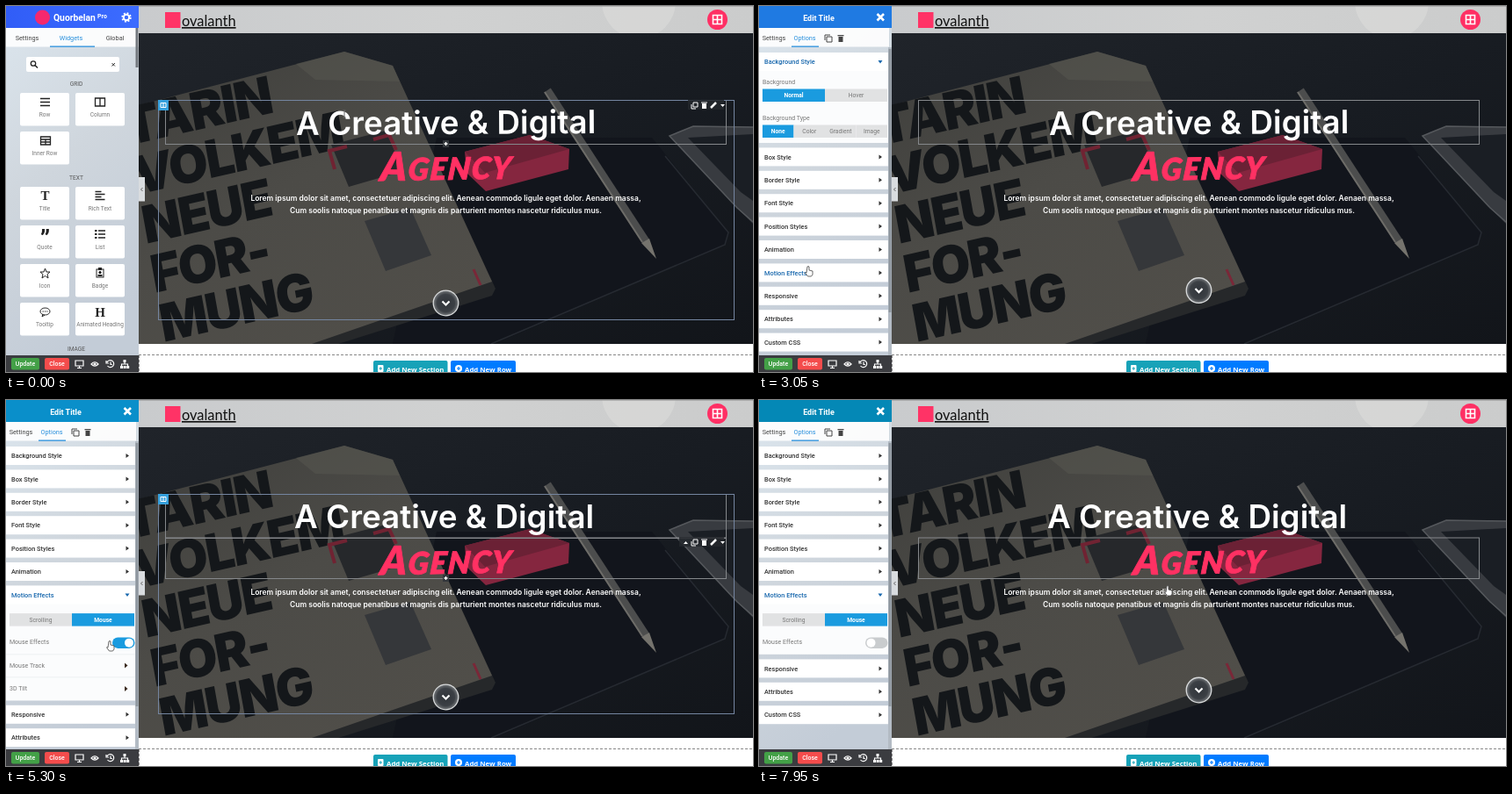
These frames come from a looping animation (850x417 px, 8 s). An HTML page:

```html
<!DOCTYPE html>
<html lang="en">
<head>
<meta charset="utf-8">
<title>Page editor</title>
<style>
html, body { margin: 0; width: 100%; height: 100%; overflow: hidden; background: #fff }
svg { display: block }
#stage { width: 850px; height: 417px; font-family: Roboto, sans-serif }
.inter { font-family: Inter, sans-serif }
</style>
</head>
<body>
<svg id="stage" viewBox="0 0 850 417"></svg>
<script>
const LOOP = 8000;
const stage = document.getElementById('stage');

// Markup helpers
const rect = (x, y, w, h, fill, more = '') =>
  `<rect x="${x}" y="${y}" width="${w}" height="${h}" fill="${fill}" ${more}/>`;
const text = (x, y, words, size, fill, more = '') =>
  `<text x="${x}" y="${y}" font-size="${size}" fill="${fill}" ${more}>${words}</text>`;
const poly = (points, fill, more = '') => `<polygon points="${points}" fill="${fill}" ${more}/>`;
const line = (d, color, width = 1, more = '') =>
  `<path d="${d}" fill="none" stroke="${color}" stroke-width="${width}" ${more}/>`;
const group = (id, body, more = '') => `<g id="${id}" ${more}>${body}</g>`;
const mid = 'text-anchor="middle"';
const midBold = mid + ' font-weight="700"';
const midMedium = mid + ' font-weight="500"';
const outline = (x, y, w, h, color) => rect(x, y, w, h, 'none', `stroke="${color}"`);

function photo() {
  const bookLines = ['TARIN', 'VOLKEM', 'NEUE', 'FOR-', 'MUNG'];
  const title = bookLines.map((word, i) =>
    `<g transform="matrix(.97 -.22 .18 1 ${139 + 10 * i} ${159 + 56 * i})">` +
    text(0, 0, word, 58, '#14171a', 'font-weight="900" class="inter" letter-spacing="-2"') + '</g>').join('');
  return `<g clip-path="url(#hero)">
    ${rect(151, 31, 699, 354, 'url(#table)')}
    ${poly('490,150 735,150 822,258 818,272 556,385 440,385', '#12151c')}
    ${line('M750 171L822 258L818 272L552 385', '#262a31', 1.5)}
    ${poly('440,68 557,322 553,330 375,386 340,386', '#26282a')}
    ${poly('151,113 385,52 440,68 553,314 345,386 151,386', 'url(#cover)')}
    ${poly('330,66 385,52 440,68 448,86 352,84', '#56554f', 'opacity=".6"')}
    ${title}
    ${poly('370,158 432,142 452,188 390,206', '#26282b')}
    ${line('M374 186L368 165L388 160M418 152L436 147L444 164', '#702332', 4)}
    ${poly('408,245 460,230 484,284 432,302', '#35373a')}
    ${line('M532 300L540 318', '#7a2738', 3)}
    ${poly('522,166 596,147 641,163 640,186 546,211 524,190', '#85263f')}
    ${poly('522,166 596,147 641,163 545,190', '#6b2135')}
    ${line('M616 96L728 268', '#4c4d4d', 9)}
    ${line('M613 98L724 269', '#6d6c68', 2)}
    ${poly('723,270 732,265 740,288', '#75736d')}
    ${poly('755,148 782,137 850,138 850,248 832,230', '#383b40')}
    ${poly('776,150 850,146 850,222 836,212', '#1a1e24')}
    ${line('M850 138L782 137L755 148L832 230L850 246', '#55585c', 1.5)}
  </g>`;
}

const toolbarIcons = (x, y, withUp) => `
  ${rect(withUp ? x - 14 : x - 4, y - 6, withUp ? 51 : 41, 11, '#24272c', 'opacity=".85"')}
  ${withUp ? poly(`${x - 9},${y + 2} ${x - 4},${y + 2} ${x - 6.5},${y - 1}`, '#fff') : ''}
  ${line(`M${x + 2} ${y - 3}h5v5h-5zM${x} ${y - 1}v5h5`, '#fff')}
  ${rect(x + 12, y - 2, 5, 6, '#fff')}${rect(x + 11, y - 3.5, 7, 1, '#fff')}
  ${line(`M${x + 22} ${y + 3}l6 -6`, '#fff', 2.5)}
  ${poly(`${x + 33},${y - 1} ${x + 38},${y - 1} ${x + 35.5},${y + 2}`, '#fff')}`;
const plus = y => rect(497, y - 4, 7, 8, '#33373c') + line(`M498.5 ${y}h4M500.5 ${y - 2}v4`, '#fff', 1.3);
const columnFrame = outline(173.5, 107.5, 655, 250, '#7485a0') + rect(173, 107, 12, 12, '#36a0dc') +
  line('M176 110.500h6v5h-6zM179 110v6', '#fff');

function formatBar() {
  const items = [['&lt;/&gt;', 191], ['B', 318], ['<tspan font-style="italic">I</tspan>', 333],
    ['<tspan text-decoration="underline">U</tspan>', 349], ['<tspan text-decoration="line-through">S</tspan>', 365],
    ['<tspan text-decoration="underline">A</tspan>', 388], ['A', 404], ['T<tspan font-size="7">x</tspan>', 428]];
  const levels = [215, 231, 246, 262, 278, 293].map((x, i) =>
    text(x, 97, `H<tspan font-size="6" dy="1">${i + 1}</tspan>`, 9, i ? '#333' : '#1976d2', midMedium)).join('');
  return rect(182, 83, 268, 23, '#fff') + levels +
    items.map(([s, x]) => text(x, 97, s, 9.5, '#222', midBold)).join('') +
    outline(400.5, 90.5, 7, 7, '#555') +
    line('M203.500 88v13M306.500 88v13M377 88v13M416.500 88v13', '#ddd') +
    rect(440, 84, 9.5, 14, '#ddd') + text(444.7, 93.500, '×', 9, '#e02030', midBold) +
    poly('182,110 819,104 819,154 182,159', 'none', 'stroke="#c9cacb"') +
    poly('181,108 820,106 820,156 181,157', 'none', 'stroke="#888b8e"') +
    line('M391.500 109v49', '#ccc');
}

function page() {
  const button = 'font-family="Open Sans, sans-serif" font-weight="700"';
  return `
  ${rect(151, 0, 699, 31, 'url(#strip)')}
  <circle cx="720" cy="-5" r="42" fill="#e0e0dd" opacity=".5" clip-path="url(#top)"/>
  ${line('M151 .5H850', '#999', 1, 'opacity=".6"')}
  ${rect(181, 7, 17.5, 18, '#ff3366')}
  ${text(200, 23, 'ovalanth', 16.4, '#111', 'font-family="Lato, sans-serif" text-decoration="underline"')}
  <circle cx="809.500" cy="15.500" r="11.500" fill="#ff2f64"/>
  ${line('M804.500 10.500h10v10h-10zM809.500 10.500v10M804.500 15.500h10', '#fff', 1.6)}
  ${photo()}
  ${group('headingBox', outline(181.5, 107.5, 638, 50, '#85888b'))}
  ${group('heroHover', columnFrame + toolbarIcons(780, 113, false) + plus(157))}
  ${group('agencyBox', outline(181.5, 157, 638, 46.5, '#85888b'))}
  ${group('agencyHover', columnFrame + toolbarIcons(780, 162, true) + plus(203))}
  ${group('heading', text(328, 146, 'A Creative &amp; Digital', 36.8, '#fff', 'class="inter" font-weight="600"'))}
  <g transform="rotate(-1 502 184) translate(425 198) skewX(-6)" font-family="Lato, sans-serif" font-weight="900">
    ${text(0, 0, 'A<tspan font-size="35">GENCY</tspan>', 45, '#ff3163', 'font-style="italic" letter-spacing="1.500" stroke="#ff3163" stroke-width=".8" stroke-linejoin="round"')}
  </g>
  <g class="inter" font-weight="600">
    ${text(500.5, 222, 'Lorem ipsum dolor sit amet, consectetuer adipiscing elit. Aenean commodo ligule eget dolor. Aenaen massa,', 8.5, '#fff', mid)}
    ${text(500.5, 236, 'Cum soolis natoque penatibus et magnis dis parturient montes nascetur ridiculus mus.', 8.5, '#fff', mid)}
  </g>
  ${group('formatBar', formatBar())}
  ${group('arrow', `<circle r="14.300" cx="500.500" fill="url(#glass)" stroke="#d8dadb" stroke-width="1.300"/>` +
    line('M496.500 -2l4 4l4 -4', '#fff', 2.2))}
  ${rect(151, 385, 699, 32, '#fff')}
  ${line('M151 397.500H850M151.500 398V417', '#888', 1, 'stroke-dasharray="3 2"')}
  ${rect(418, 404, 84.5, 16, '#17a2b8', 'rx="2"')}${rect(506, 404, 74, 16, '#007bff', 'rx="2"')}
  ${rect(423, 409, 6.5, 8, '#fff', 'rx="1"')}<circle cx="515" cy="413" r="4" fill="#fff"/>
  ${line('M513 413h4M515 411v4', '#007bff', 1.2)}${line('M424.500 413h3.500M426.200 411.300v3.500', '#17a2b8')}
  ${text(433, 416.5, 'Add New Section', 7.8, '#fff', button)}
  ${text(522, 416.5, 'Add New Row', 7.8, '#fff', button)}`;
}

function widgetPanel() {
  const bars = (x, y, w) => line(`M${x} ${y}h${w}m${-w} 4h${w}m${-w} 4h${w}`, '#222', 1.6);
  const glyph = (s, x, y) => text(x, y, s, 15, '#222', midBold + ' font-family="Liberation Serif, serif"');
  const cards = [
    ['Row', 16, 99, bars(39, 105.5, 11)],
    ['Column', 79, 99, line('M101.500 105h11v9h-11zM107 105v9', '#222', 1.3)],
    ['Inner Row', 16, 143, line('M39.500 149h11v9h-11zM39.500 152h11M39.500 155h11M45 152v6', '#222', 1.3)],
    ['Title', 16, 206, glyph('T', 44.5, 221)],
    ['Rich Text', 79, 206, line('M101.500 211.500h7M101.500 214.500h11M101.500 217.500h7M101.500 220.500h11', '#222', 1.5)],
    ['Quote', 16, 250, text(44.5, 275, '”', 28, '#222', midBold)],
    ['List', 79, 250, bars(105, 256, 8) + line('M101 256h2.500m-2.500 4h2.500m-2.500 4h2.500', '#222', 2)],
    ['Icon', 16, 294, poly('44.5,299 46,303 50,303 47,305.7 48,310 44.5,307.500 41,310 42,305.7 39,303 43,303', 'none', 'stroke="#222"')],
    ['Badge', 79, 294, outline(103, 300, 8, 9, '#222') + rect(105, 298, 4, 3, '#222') + '<circle cx="107" cy="303.500" r="1.500"/>' + rect(104.5, 306, 5, 2, '#222')],
    ['Tooltip', 16, 338, '<ellipse cx="44.500" cy="348" rx="5.500" ry="4" fill="none" stroke="#222"/>' + line('M41.500 348h6', '#222', 1.2, 'stroke-dasharray="1.400 1"') + line('M42 351l-1 3l3 -2', '#222')],
    ['Animated Heading', 79, 338, glyph('H', 107, 354)]
  ];
  const section = (name, y) => text(80, y, name, 6.6, '#555', mid);
  return rect(0, 0, 151, 25, 'url(#brand)') +
    '<circle cx="41.500" cy="13" r="8.500" fill="#f5286e"/>' +
    text(54, 17, 'Quorbelan', 10.3, '#fff', 'font-weight="700"') +
    text(104, 14, 'Pro', 7, '#fff', 'font-weight="700"') +
    '<circle cx="137" cy="13" r="3.200" fill="none" stroke="#fff" stroke-width="2"/>' +
    '<circle cx="137" cy="13" r="4.800" fill="none" stroke="#fff" stroke-width="1.800" stroke-dasharray="1.900 1.870"/>' +
    rect(0, 25, 151, 21.5, '#fff', 'opacity=".9"') +
    text(24, 38.5, 'Settings', 7.3, '#444', mid) + text(74, 38.5, 'Widgets', 7.3, '#2990dd', mid) +
    text(124, 38.5, 'Global', 7.3, '#444', mid) + rect(50, 45.5, 51, 1.3, '#2990dd') +
    rect(23, 58, 106, 17, '#fff', 'rx="2"') +
    '<circle cx="31" cy="65.500" r="2.700" fill="none" stroke="#222" stroke-width="1.300"/>' +
    line('M33 67.500l3 3', '#222', 1.5) + line('M120.500 65l3.500 3.500m0 -3.500l-3.500 3.500', '#333') +
    section('GRID', 91) + section('TEXT', 198) + section('IMAGE', 393) +
    cards.map(([name, x, y, icon]) => rect(x, y, 56, 37.5, '#fff', 'rx="2"') + icon +
      text(x + 28, y + 27, name, 6.5, '#777', mid)).join('') +
    rect(147.5, 25, 3, 45, '#72777d');
}

const sections = ['Background Style', 'Box Style', 'Border Style', 'Font Style', 'Position Styles',
  'Animation', 'Motion Effects', 'Responsive', 'Attributes', 'Custom CSS'];
const BACKGROUND = 0, MOTION = 6, PITCH = 26.4;

function buttons(y, labels, active) {
  const w = 142 / labels.length;
  return labels.map((label, i) => rect(4 + w * i, y, w, 14.5, i == active ? '#1a9bdf' : '#e1e2e3') +
    text(4 + w * (i + .5), y + 9.7, label, 6.7, i == active ? '#fff' : '#777', i == active ? midBold : mid)).join('');
}

function editPanel() {
  const label = (y, words) => text(4, y, words, 7, '#777');
  const arrowRight = y => poly(`135,${y - 3} 138.500,${y} 135,${y + 3}`, '#3a2a20');
  const bodies = {
    [BACKGROUND]: label(16, 'Background') + buttons(21.5, ['Normal', 'Hover'], 0) +
      label(57, 'Background Type') + buttons(62.5, ['None', 'Color', 'Gradient', 'Image'], 0),
    [MOTION]: buttons(11.7, ['Scrolling', 'Mouse'], 1) + label(47, 'Mouse Effects') +
      rect(121, 39, 25.5, 12.5, '#ccc', 'id="toggle" rx="6.250"') + '<circle id="knob" cy="45.250" r="5" fill="#fff"/>' +
      line('M0 58.500H148M0 84.500H148', '#edf0f2') +
      label(73.5, 'Mouse Track') + arrowRight(71) + label(99.5, '3D Tilt') + arrowRight(97.5)
  };
  const rows = sections.map((name, i) => `<g id="row${i}">
    ${bodies[i] ? `<svg id="body${i}" y="20" width="148" height="0">${rect(0, 0, 148, 120, '#fbfcfd')}${bodies[i]}</svg>` : ''}
    ${rect(0, 0, 148, 21, '#fff')}
    ${text(6, 13.2, name, 7.4, '#333', `id="name${i}" font-weight="500"`)}
    <polygon id="mark${i}" points="-1.500,-2.500 2,0 -1.500,2.500" fill="#333"/></g>`).join('');
  return `<svg width="151" height="398">${rows}</svg>` +
    rect(0, 0, 151, 25, '#0a88c0', 'id="editHead"') +
    text(68, 16.5, 'Edit Title', 9, '#fff', midBold) + line('M134.500 9l7.500 7.500m0 -7.500l-7.500 7.500', '#fff', 2.6) +
    rect(0, 25, 148, 21.5, '#fff', 'opacity=".9"') +
    text(17, 39, 'Settings', 7.3, '#444', mid) + text(52, 39, 'Options', 7.3, '#2990dd', mid) + rect(37, 45.5, 31, 1.3, '#2990dd') +
    line('M77 35h6v6h-6zM75 39v-6h6', '#444') + rect(90.5, 35, 5, 6, '#444') + rect(89.5, 33, 7, 1.3, '#444') +
    rect(147, 47, 4, 351, '#b3bbc4') + rect(147.5, 49, 3, 300, '#8f979f');
}

const bottomBar = rect(0, 398, 151, 19, '#3b3c40') +
  rect(6, 401, 32, 13.5, '#43a047', 'rx="2"') + text(22, 410.3, 'Update', 7, '#fff', midMedium) +
  rect(44, 401, 28, 13.5, '#f44c4c', 'rx="2"') + text(58, 410.3, 'Close', 7, '#fff', midMedium) +
  line('M79 404h9v6h-9zM81 412.500h5M83.500 410v2', '#fff', 1.2) +
  line('M97 408q4 -4.500 8 0q-4 4.500 -8 0z', '#fff', 1.2) + '<circle cx="101" cy="408" r="1.600" fill="#fff"/>' +
  line('M115 406a4 4 0 1 1 .5 4M114 404v3h3M119 405.500v3h2', '#fff', 1.2) +
  line('M135 404v4M131.500 411v-3h7v3', '#fff', 1.2) + rect(133.5, 403, 3, 3, '#fff') +
  rect(130, 410, 3, 3, '#fff') + rect(133.6, 410, 3, 3, '#fff') + rect(137.2, 410, 3, 3, '#fff');

const cursors = group('beam', line('M-1.500 -4h3M0 -4v8M-1.500 4h3', '#666')) +
  group('hand', '<path d="M-1 -5q1 -1 2 0v4l4 1v4l-1.500 2h-4l-3 -4q0 -1 1.500 0z" fill="#fff" stroke="#444" stroke-width=".8"/>') +
  group('pointer', '<path d="M-1 -4v10l2.300 -2l1.700 3.500l1.500 -.8l-1.700 -3.200h3z" fill="#fff" stroke="#333" stroke-width=".6"/>');

const gradient = (id, dir, ...stops) => `<linearGradient id="${id}" ${dir}>` +
  stops.map((c, i) => `<stop offset="${i / (stops.length - 1)}" stop-color="${c}"/>`).join('') + '</linearGradient>';
stage.innerHTML = `<defs>
  ${gradient('table', 'x2="1" y2="1"', '#20242a', '#181c22', '#12151a')}
  ${gradient('cover', 'x2=".7" y2="1"', '#3f3f3c', '#4c4b47', '#504e49')}
  ${gradient('strip', '', '#c9cbcd', '#d0d1d1', '#cbcccc')}
  ${gradient('panel', 'x2=".3" y2="1"', '#dce6ee', '#cfd6dd', '#c3ccd7')}
  ${gradient('brand', '', '#315df7', '#3c6cff')}
  <radialGradient id="glass"><stop stop-color="#30343a"/><stop offset=".7" stop-color="#3c4045"/><stop offset="1" stop-color="#777a7d"/></radialGradient>
  <clipPath id="hero">${rect(151, 31, 699, 354, '#000')}</clipPath>
  <clipPath id="top">${rect(151, 0, 699, 31, '#000')}</clipPath></defs>
  ${rect(0, 0, 850, 417, '#fff')}${page()}
  ${rect(0, 0, 151, 417, 'url(#panel)')}
  ${group('widgets', widgetPanel())}${group('edit', editPanel())}${bottomBar}
  ${rect(151, 195, 7, 27.5, '#d9dcdf')}${line('M155.500 207l-2 2l2 2', '#666')}
  ${group('cursor', cursors)}`;

// Motion
const el = id => document.getElementById(id);
const set = (id, attributes) => { for (const k in attributes) el(id).setAttribute(k, attributes[k]); };
const show = (id, amount) => set(id, { opacity: +amount });
const clamp = v => Math.max(0, Math.min(1, v));
const smooth = p => p * p * (3 - 2 * p);
const ramp = (t, start, length) => smooth(clamp((t - start) / length));

// Same curve as the CSS "ease" keyword
function ease(p) {
  let low = 0, high = 1, u = .5;
  for (let i = 0; i < 18; i++) {
    u = (low + high) / 2;
    if (.75 * u * (1 - u) + u ** 3 < p) low = u; else high = u;
  }
  return .3 * (1 - u) ** 2 * u + 3 * (1 - u) * u * u + u ** 3;
}

function track(keys, t, curve) {
  const i = keys.findIndex(k => k[0] > t);
  if (i < 0) return keys[keys.length - 1].slice(1);
  if (i == 0) return keys[0].slice(1);
  const a = keys[i - 1], b = keys[i], p = curve((t - a[0]) / (b[0] - a[0]));
  return a.slice(1).map((v, n) => v + (b[n + 1] - v) * p);
}

const cursorPath = [[0, 385, 123], [225, 385, 123], [1000, 79, 59], [1150, 79, 59], [1400, 53, 38], [1600, 53, 38],
  [1900, 131, 92], [2100, 131, 92], [3000, 56, 302], [3350, 56, 302], [3800, 110, 252], [4050, 112, 252],
  [4650, 462, 197], [4750, 462, 197], [5300, 118, 280], [5500, 104, 273], [5650, 104, 273], [6050, 88, 311],
  [6400, 88, 311], [6750, 133, 277], [7250, 133, 277], [7950, 465, 217]];
const headColor = [[1250, 50, 104, 246], [1950, 46, 109, 240], [3050, 31, 122, 226], [4650, 11, 141, 205],
  [6100, 8, 145, 198], [7950, 4, 136, 182]];
const bounceStarts = [270, 2270, 4080, 6030, 7880];
const bounceKeys = [[0, 0], [380, 30], [570, 0], [760, 15], [1140, 0]];

function draw(t) {
  const start = bounceStarts.filter(s => s <= t).pop() ?? t;
  set('arrow', { transform: `translate(0 ${338.5 - track(bounceKeys, t - start, ease)[0]})` });

  const editing = t >= 1300;
  show('widgets', !editing);
  show('edit', editing);
  set('editHead', { fill: `rgb(${track(headColor, t, p => p).map(Math.round)})` });

  const opened = ramp(t, 3300, 250), switchedOff = ramp(t, 6850, 250);
  const heights = { [BACKGROUND]: 82 * (1 - opened), [MOTION]: opened * (110 - 52.4 * switchedOff) };
  let y = 53;
  sections.forEach((name, i) => {
    const height = heights[i] || 0;
    const isOpen = height > 1, hovered = i == MOTION && t > 2950 && t < 3400;
    set('row' + i, { transform: `translate(0 ${y})` });
    set('name' + i, { fill: isOpen || hovered ? '#1767ad' : '#333' });
    set('mark' + i, { transform: `translate(138 10.500) rotate(${isOpen ? 90 : 0})`, fill: isOpen ? '#1767ad' : '#333' });
    if (i in heights) set('body' + i, { height: height + (isOpen ? 1 : 0) });
    y += PITCH + height;
  });
  const on = 1 - ramp(t, 6800, 150);
  set('toggle', { fill: on > .5 ? '#1a9bdf' : '#c9ccce' });
  set('knob', { cx: 127.5 + 12.5 * on });

  const formatting = t >= 1300 && t < 2775;
  show('formatBar', formatting);
  show('headingBox', !formatting && t < 6300);
  show('heroHover', t < 1925);
  show('agencyBox', t >= 4500);
  show('agencyHover', ramp(t, 4480, 260) * (1 - ramp(t, 6150, 250)));
  set('heading', { transform: t < 3400 ? 'translate(2 0) rotate(-.35 500 132)' : '' });

  const [x, cy] = track(cursorPath, t, smooth);
  set('cursor', { transform: `translate(${x} ${cy})` });
  const beam = t < 1200, pointer = t > 4400 && t < 5100;
  show('beam', beam);
  show('pointer', pointer);
  show('hand', !beam && !pointer);
}

function tick() {
  draw(performance.now() % LOOP);
  requestAnimationFrame(tick);
}
tick();
</script>
</body>
</html>
```
